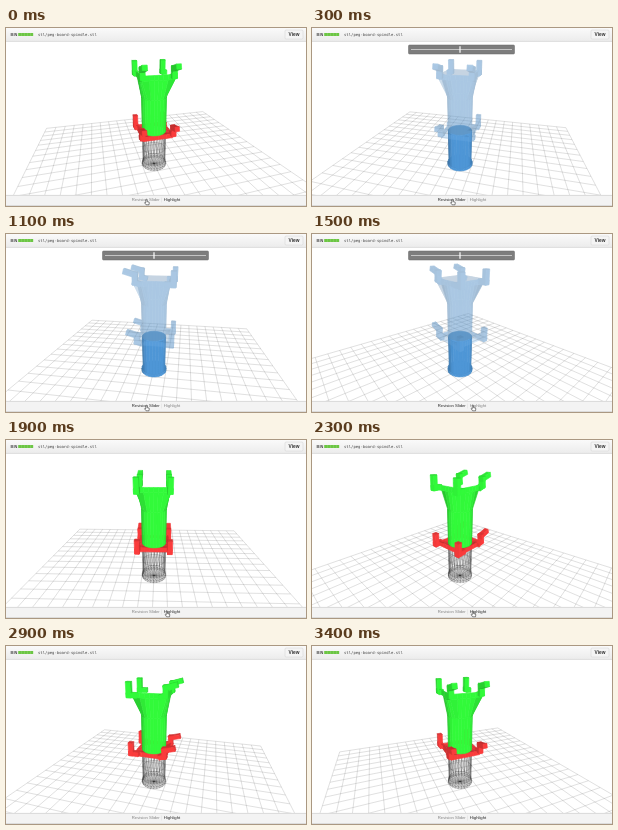
Write an HTML page with a canvas that moves like this. It is 300 by 178 pixels and loops after 3500 ms.

```html
<!DOCTYPE html>
<html lang="en">
<head>
<meta charset="utf-8">
<title>Spindle model viewer</title>
<style>
html, body { margin: 0; width: 300px; height: 178px; overflow: hidden; background: #fff; }
canvas, svg { position: absolute; left: 0; top: 0; width: 300px; height: 178px; }
text { font-family: "Liberation Sans", Arial, sans-serif; }
.path { font: 3.92px "DejaVu Sans Mono", monospace; fill: #444; }
.tab { font-size: 4.2px; text-anchor: middle; fill: #808080; }
.tab.on { fill: #222; }
</style>
</head>
<body>
<canvas id="view"></canvas>
<svg viewBox="0 0 300 178">
  <defs>
    <linearGradient id="bar" x2="0" y2="1"><stop stop-color="#fafafa"/><stop offset="1" stop-color="#ececec"/></linearGradient>
  </defs>
  <rect width="300" height="13" fill="url(#bar)"/>
  <path d="M0 13.4H300" stroke="#d4d4d4" stroke-width=".8"/>
  <text x="4.6" y="8" font-size="3.9" font-weight="bold" fill="#444">BIN</text>
  <path d="M12.2 6.5H27.2" stroke="#6cc644" stroke-width="3" stroke-dasharray="2.9 .12"/>
  <text class="path" x="32" y="8">stl/peg-board-spindle.stl</text>
  <rect x="279" y="2" width="18" height="9" rx="1.2" fill="#f4f4f4" stroke="#d0d0d0" stroke-width=".5"/>
  <text x="288" y="8.2" font-size="4.8" font-weight="bold" text-anchor="middle" fill="#333">View</text>
  <g id="slider">
    <rect x="96.5" y="17" width="106" height="9" rx="1" fill="#7d7d7d" stroke="#666" stroke-width=".5"/>
    <path d="M99 21.5H200" stroke="#c4c4c4" stroke-width="1"/>
    <path d="M148 18.3V24.7" stroke="#fff" stroke-width="1.2"/>
  </g>
  <rect y="167" width="300" height="11" fill="#f3f3f3"/>
  <path d="M0 167.4H300M0 177.6H300" stroke="#d4d4d4" stroke-width=".8"/>
  <text class="tab" id="tabSlider" x="139.8" y="173.2">Revision Slider</text>
  <path d="M155.5 169.5V174.5" stroke="#ddd" stroke-width=".5"/>
  <text class="tab" id="tabHigh" x="166" y="173.2">Highlight</text>
  <path id="hand" d="M-.7 0Q0 -.7 .5 0V2L2.6 2.5Q3 3 2.5 5.2H-.4L-1.9 3.1Q-1.6 2.4 -.7 3.1Z" fill="#fff" stroke="#222" stroke-width=".55"/>
</svg>
<script>
const LOOP = 3500, STEP = 100;
const SEG = 24, TURN = 10.4, START = -196;
const CAM = { x: 148, y: 89, f: 200, dist: 168, high: 118, pitch: 22 * Math.PI / 180 };
const GRID = 120, CELLS = 20;
const GREEN = [50, 250, 58], RED = [250, 60, 60], BLUE = [112, 174, 230], DEEP = [78, 150, 214];

const $ = id => document.getElementById(id);
const ratio = Math.max(1, window.devicePixelRatio || 1);
function fit(canvas) {
  canvas.width = 300 * ratio;
  canvas.height = 178 * ratio;
  const c = canvas.getContext('2d');
  c.scale(ratio, ratio);
  c.lineJoin = 'round';
  return c;
}
const ctx = fit($('view'));
const layer = document.createElement('canvas');
const layerCtx = fit(layer);

const sub = (a, b) => a.map((v, i) => v - b[i]);
const dot = (a, b) => a[0] * b[0] + a[1] * b[1] + a[2] * b[2];
const cross = (a, b) => [a[1] * b[2] - a[2] * b[1], a[2] * b[0] - a[0] * b[2], a[0] * b[1] - a[1] * b[0]];
const unit = a => { const n = Math.hypot(...a) || 1; return a.map(v => v / n); };
const mean = pts => [0, 1, 2].map(i => pts.reduce((s, p) => s + p[i], 0) / pts.length);

// Faces are wound outward from the middle of their solid.
function addFace(list, pts, mid, color) {
  let n = unit(cross(sub(pts[1], pts[0]), sub(pts[2], pts[0])));
  if (dot(n, sub(mean(pts), mid)) < 0) {
    pts = pts.slice().reverse();
    n = n.map(v => -v);
  }
  list.push({ pts, n, color });
}

function outline(r, y, square) {
  return Array.from({ length: SEG }, (_, i) => {
    const a = i / SEG * 2 * Math.PI, c = Math.cos(a), s = Math.sin(a);
    const k = square ? r / Math.max(Math.abs(c), Math.abs(s)) : r;
    return [c * k, y, s * k];
  });
}

function band(list, low, high, color) {
  const mid = mean(low.concat(high));
  low.forEach((p, i) => {
    const j = (i + 1) % SEG;
    addFace(list, [p, low[j], high[j], high[i]], mid, color);
  });
}

function bar(list, x, [z0, y0], [z1, y1], t, color) {
  const d = Math.hypot(z1 - z0, y1 - y0), uz = (z1 - z0) / d * t, uy = (y1 - y0) / d * t;
  const flat = [[z0 - uz - uy, y0 - uy + uz], [z1 + uz - uy, y1 + uy + uz],
                [z1 + uz + uy, y1 + uy - uz], [z0 - uz + uy, y0 - uy - uz]];
  const left = flat.map(([z, y]) => [x - t, y, z]);
  const right = flat.map(([z, y]) => [x + t, y, z]);
  const mid = mean(left.concat(right));
  addFace(list, left, mid, color);
  addFace(list, right, mid, color);
  left.forEach((p, i) => {
    const j = (i + 1) % 4;
    addFace(list, [p, left[j], right[j], right[i]], mid, color);
  });
}

function hooks(list, y, w, color) {
  const prong = [[12, y], [17, y], [17, y + 8.5]];
  const peg = [[-10, y], [-13, y + 1], [-13, y + 7], [-20, y + 9]];
  for (const x of [-w, w])
    for (const line of [prong, peg])
      for (let i = 1; i < line.length; i++) bar(list, x, line[i - 1], line[i], 1.9, color);
}

const model = [];
const neck = outline(10.8, 69), foot = outline(10.8, 36.5);
const rimTop = outline(13.5, 90, true), rimLow = outline(13.5, 86, true);
addFace(model, rimTop, [0, 0, 0], GREEN);
band(model, rimLow, rimTop, GREEN);
band(model, neck, rimLow, GREEN);
band(model, foot, neck, GREEN);
hooks(model, 87.8, 13, GREEN);
const trayTop = outline(13.5, 38, true), trayLow = outline(13.5, 34, true);
band(model, trayLow, trayTop, RED);
trayTop.forEach((p, i) => {
  const j = (i + 1) % SEG;
  addFace(model, [p, trayTop[j], foot[j], foot[i]], [0, 0, 0], RED);
});
hooks(model, 36.5, 14, RED);

const stump = [];
const cut = outline(10.8, 37), sole = outline(10.8, 2);
band(stump, sole, cut, DEEP);
addFace(stump, cut, [0, 0, 0], [104, 164, 216]);
const discTop = outline(12, 2.5), discLow = outline(12, 0);
band(stump, discLow, discTop, DEEP);
addFace(stump, discTop, [0, 0, 0], DEEP);

let cosA, sinA;
const cosP = Math.cos(CAM.pitch), sinP = Math.sin(CAM.pitch);
const light = unit([0.1, 0.35, 0.9]);
const spin = ([x, y, z]) => [x * cosA - z * sinA, y, x * sinA + z * cosA];
function project(p) {
  const [x, y, z] = spin(p);
  const dz = CAM.dist - z, dy = CAM.high - y;
  const depth = dz * cosP + dy * sinP;
  return [CAM.x + CAM.f * x / depth, CAM.y + CAM.f * (dy * cosP - dz * sinP) / depth, depth];
}

function trace(c, pts, close) {
  c.beginPath();
  pts.forEach((p, i) => i ? c.lineTo(p[0], p[1]) : c.moveTo(p[0], p[1]));
  if (close) c.closePath();
}

function drawFaces(c, list, front, tint) {
  const eye = [0, CAM.high, CAM.dist];
  list.map(f => {
    const n = spin(f.n);
    return { f, n, out: dot(n, sub(eye, spin(f.pts[0]))) > 0 };
  }).filter(o => o.out === front)
    .map(o => {
      const pts = o.f.pts.map(project);
      return { ...o, pts, depth: mean(pts)[2] };
    })
    .sort((a, b) => b.depth - a.depth)
    .forEach(o => {
      const k = Math.min(1, 0.72 + 0.4 * Math.max(0, dot(o.n, light)));
      const rgb = (tint || o.f.color).map(v => Math.round(v * k));
      c.fillStyle = c.strokeStyle = `rgb(${rgb})`;
      c.lineWidth = 0.6;
      trace(c, o.pts, true);
      c.fill();
      c.stroke();
    });
}

function drawGhost(front) {
  layerCtx.clearRect(0, 0, 300, 178);
  drawFaces(layerCtx, model, front, BLUE);
  ctx.globalAlpha = 0.32;
  ctx.drawImage(layer, 0, 0, 300, 178);
  ctx.globalAlpha = 1;
}

function drawGrid() {
  ctx.strokeStyle = 'rgba(90,90,90,.38)';
  ctx.lineWidth = 0.5;
  for (let i = 0; i <= CELLS; i++) {
    const v = GRID * (2 * i / CELLS - 1);
    trace(ctx, [[v, 0, -GRID], [v, 0, GRID]].map(project));
    ctx.stroke();
    trace(ctx, [[-GRID, 0, v], [GRID, 0, v]].map(project));
    ctx.stroke();
  }
}

function drawWire() {
  const rings = [[10.8, 35], [10.8, 18], [10.8, 5], [11.6, 2], [11.6, 0]]
    .map(([r, y]) => outline(r, y).map(project));
  ctx.strokeStyle = 'rgba(30,30,30,.5)';
  ctx.fillStyle = 'rgba(120,120,120,.12)';
  ctx.lineWidth = 0.35;
  rings.forEach((ring, k) => {
    trace(ctx, ring, true);
    ctx.fill();
    if (!k) return;
    ctx.stroke();
    const up = rings[k - 1];
    ring.forEach((p, i) => {
      trace(ctx, [up[i], p, up[(i + 1) % SEG]]);
      ctx.stroke();
    });
  });
  const hub = project([0, 0, 0]);
  rings[4].forEach(p => { trace(ctx, [hub, p]); ctx.stroke(); });
}

function draw(time) {
  const t = Math.floor(time / STEP) * STEP;
  const a = (START + TURN * t / STEP) * Math.PI / 180;
  cosA = Math.cos(a);
  sinA = Math.sin(a);
  const sliding = t >= 200 && t < 1600;

  ctx.fillStyle = '#fff';
  ctx.fillRect(0, 0, 300, 178);
  drawGrid();
  if (sliding) {
    drawGhost(false);
    drawFaces(ctx, stump, true);
    drawGhost(true);
  } else {
    drawWire();
    drawFaces(ctx, model, true);
  }

  $('slider').style.display = sliding ? '' : 'none';
  $('tabSlider').classList.toggle('on', sliding);
  $('tabHigh').classList.toggle('on', !sliding);
  const move = Math.min(1, Math.max(0, (t - 1200) / 300));
  $('hand').style.display = t < 2600 ? '' : 'none';
  $('hand').setAttribute('transform', `translate(${140.5 + 20.5 * move} 171.6)`);
}

const begin = performance.now();
(function tick() {
  draw((performance.now() - begin) % LOOP);
  requestAnimationFrame(tick);
})();
</script>
</body>
</html>
```
